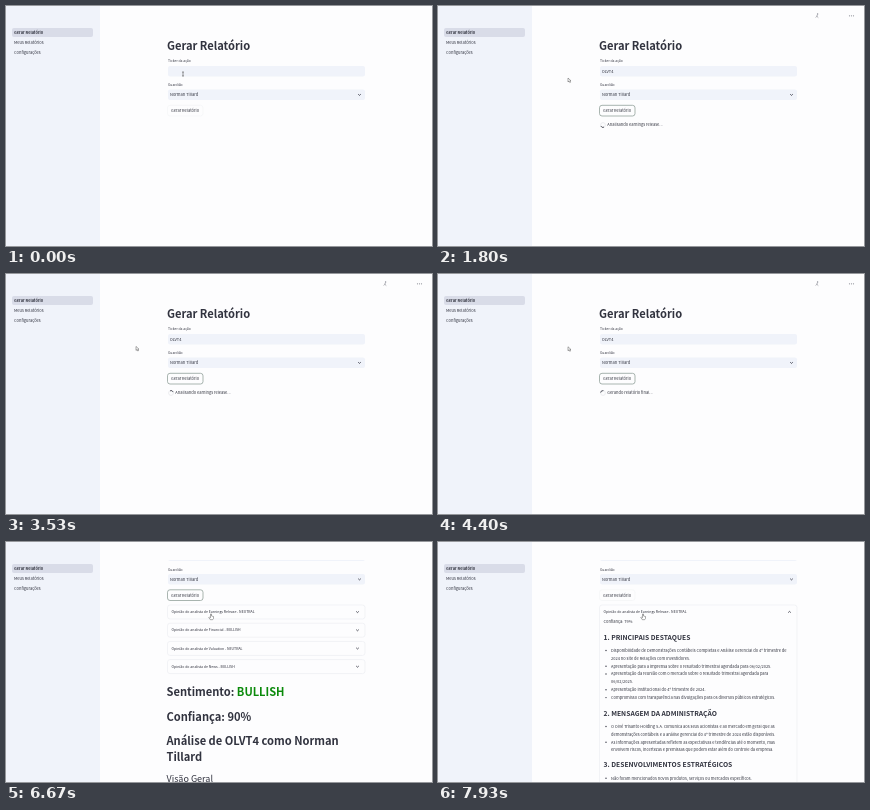
Write an HTML page with a canvas that moves like this. It is 426 by 240 pixels and loops after 8000 ms.

```html
<!DOCTYPE html>
<html lang="pt">
<head>
<meta charset="utf-8">
<title>Gerar Relatório</title>
<style>
html, body { margin: 0; width: 100%; height: 100%; overflow: hidden; background: #fdfdfe; }
canvas { display: block; width: 426px; height: 240px; }
</style>
</head>
<body>
<canvas id="stage"></canvas>
<script>
const W = 426, H = 240, LOOP = 8000, FPS = 15;
const FONT = '"Noto Sans CJK JP", "Noto Sans CJK SC", "Noto Sans CJK", "Open Sans", sans-serif';
const PAGE = '#fdfdfe', INK = '#31333f', PANEL = '#f0f3fa', LINE = '#eceef2', GREEN = '#0b8a0b';
const TICKER = 'OLVT4', PERSON = ['Norman', 'Tillard'], COMPANY = 'Olvé Trisanto Holding S.A.';
const SCROLL = 51.5, OPEN_HEIGHT = 230, HEADING = 11.1;

// Moments in ms
const T = { type: 300, key: 120, run: 1300, final: 3600, done: 5000, scroll: 5900, open: 7130 };

const POINTER = [
  [0, 177, 68], [950, 177, 68], [1200, 180, 105], [1300, 180, 105], [1600, 130, 72],
  [5650, 130, 73], [5900, 205, 72], [LOOP, 205, 72]
];

const ANALYSTS = ['Earnings Release - NEUTRAL', 'Financial - BULLISH', 'Valuation - NEUTRAL', 'News - BULLISH'];

// Lines starting with "*" carry a bullet
const REPORT = [
  { title: '1. PRINCIPAIS DESTAQUES', y: 97.5, first: 109.8, lines: [
    '*Disponibilidade de Demonstrações Contábeis Completas e Análise Gerencial do 4º trimestre de',
    '2024 no site de Relações com Investidores.',
    '*Apresentação para a imprensa sobre o resultado trimestral agendada para 06/02/2025.',
    '*Apresentação da reunião com o mercado sobre o resultado trimestral agendada para',
    '06/02/2025.',
    '*Apresentação institucional do 4º trimestre de 2024.',
    '*Compromisso com transparência nas divulgações para os diversos públicos estratégicos.'] },
  { title: '2. MENSAGEM DA ADMINISTRAÇÃO', y: 173.5, first: 185.8, lines: [
    `*O ${COMPANY} comunica aos seus acionistas e ao mercado em geral que as`,
    'demonstrações contábeis e a análise gerencial do 4º trimestre de 2024 estão disponíveis.',
    '*As informações apresentadas refletem as expectativas e tendências até o momento, mas',
    'envolvem riscos, incertezas e premissas que podem estar além do controle da empresa.'] },
  { title: '3. DESENVOLVIMENTOS ESTRATÉGICOS', y: 225, first: 237.6, lines: [
    '*Não foram mencionados novos produtos, serviços ou mercados específicos.'] }
];

const canvas = document.getElementById('stage');
const ctx = canvas.getContext('2d');
const ratio = window.devicePixelRatio || 1;
canvas.width = W * ratio;
canvas.height = H * ratio;

const clamp = x => Math.max(0, Math.min(1, x));
const ease = x => x * x * (3 - 2 * x);
const progress = (t, start, length) => ease(clamp((t - start) / length));

// Set large and scaled down evenly, so tiny glyphs keep their true shapes
function text(str, x, y, size, weight = 400, color = INK) {
  const em = 64, scale = size / em;
  ctx.save();
  ctx.translate(x, y);
  ctx.scale(scale, scale);
  ctx.font = `${weight} ${em}px ${FONT}`;
  ctx.fillStyle = color;
  ctx.fillText(str, 0, 0);
  const width = ctx.measureText(str).width * scale;
  ctx.restore();
  return x + width;
}

function box(x, y, w, h, r, fill, stroke) {
  ctx.beginPath();
  ctx.roundRect(x, y, w, h, r);
  if (fill) { ctx.fillStyle = fill; ctx.fill(); }
  if (stroke) { ctx.strokeStyle = stroke; ctx.lineWidth = 0.7; ctx.stroke(); }
}

function path(points, color, width) {
  ctx.beginPath();
  points.forEach(([x, y]) => ctx.lineTo(x, y));
  ctx.strokeStyle = color;
  ctx.lineWidth = width;
  ctx.stroke();
}

function dot(x, y, r, color) {
  ctx.beginPath();
  ctx.arc(x, y, r, 0, Math.PI * 2);
  ctx.fillStyle = color;
  ctx.fill();
}

function chevron(x, y, up) {
  const d = up ? -0.6 : 0.6;
  path([[x - 1.3, y - d], [x, y + d], [x + 1.3, y - d]], INK, 0.8);
}

function sidebar() {
  ctx.fillStyle = PANEL;
  ctx.fillRect(0, 0, 94, H);
  box(6, 22, 81, 9, 2, '#d9dce8');
  text('Gerar Relatório', 8, 28, 3.9, 700);
  text('Meus Relatórios', 8, 38.3, 4);
  text('Configurações', 8, 48.3, 4);
}

function form(t) {
  text('Gerar Relatório', 161, 44.3, HEADING, 700);
  text('Ticker da ação', 162, 56.2, 3.4);
  box(162, 60, 197, 10.5, 2, PANEL);
  const typed = Math.floor((t - T.type) / T.key);
  text(TICKER.slice(0, Math.max(0, typed)), 163.7, 66.7, 4);
  text('Guardião', 162, 80, 3.4);
  box(162, 83.5, 197, 10.5, 2, PANEL);
  text(PERSON.join(' '), 164, 90.2, 4);
  chevron(353.5, 88.8);
  const focused = t >= T.run && t < T.open;
  box(161.5, 99.3, 35.5, 10.7, 2.5, PAGE, focused ? '#85958f' : '#f4f5f7');
  text('Gerar Relatório', 165, 106, 4);
}

function spinner(t) {
  const angle = (110 + 0.325 * (t - 1800)) * Math.PI / 180;
  ctx.lineWidth = 0.8;
  ctx.strokeStyle = '#e8e9ed';
  ctx.beginPath();
  ctx.arc(165, 119, 2.4, 0, Math.PI * 2);
  ctx.stroke();
  ctx.strokeStyle = INK;
  ctx.beginPath();
  ctx.arc(165, 119, 2.4, angle - 0.8, angle + 0.8);
  ctx.stroke();
  text(t < T.final ? 'Analisando earnings release...' : 'Gerando relatório final...', 169.3, 120.2, 4);
}

function report() {
  text('Confiança: 79%', 165.5, 81, 4);
  for (const part of REPORT) {
    text(part.title, 165.5, part.y, 6.75, 700);
    part.lines.forEach((line, i) => {
      const y = part.first + i * 7.85;
      if (line[0] === '*') dot(168, y - 1.3, 0.7, INK);
      text(line.replace('*', ''), 173, y, 4);
    });
  }
}

function results(t) {
  const grow = OPEN_HEIGHT * progress(t, T.open, 300);
  ANALYSTS.forEach((name, i) => {
    const y = 114.5 + i * 18.2 + (i ? grow : 0);
    const extra = i ? 0 : grow;
    box(161.5, y, 197.5, 14 + extra, 2.5, PAGE, LINE);
    text('Opinião do analista de ' + name, 165.5, y + 8.2, 3.5);
    chevron(351.5, y + 7, extra > 0);
    if (extra > 0) {
      ctx.save();
      ctx.beginPath();
      ctx.rect(161, y + 14, 198, extra);
      ctx.clip();
      ctx.translate(0, SCROLL);
      report();
      ctx.restore();
    }
  });
  ctx.save();
  ctx.translate(0, grow);
  const x = text('Sentimento: ', 160.5, 205, HEADING, 700);
  text('BULLISH', x, 205, HEADING, 700, GREEN);
  text('Confiança: 90%', 160.5, 230, HEADING, 700);
  text(`Análise de ${TICKER} como ${PERSON[0]}`, 160.5, 254.8, HEADING, 700);
  text(PERSON[1], 160.5, 270, HEADING, 700);
  text('Visão Geral', 160.5, 291.6, 9, 500);
  ctx.restore();
}

function toolbar() {
  // Small running figure and menu dots
  dot(379.6, 8, 0.7, '#8b8d96');
  path([[379.3, 8.8], [378.9, 10.3], [380.3, 11.6]], '#8b8d96', 0.7);
  path([[378.9, 10.3], [377.6, 11.4]], '#8b8d96', 0.7);
  for (let i = 0; i < 3; i++) dot(411.5 + i * 2, 9.8, 0.6, '#8b8d96');
}

function pointerAt(t) {
  const i = POINTER.findIndex(p => p[0] > t);
  const [t0, x0, y0] = POINTER[i - 1], [t1, x1, y1] = POINTER[i];
  const k = progress(t, t0, t1 - t0);
  return [x0 + (x1 - x0) * k, y0 + (y1 - y0) * k];
}

function pointer(t) {
  const [x, y] = pointerAt(t);
  ctx.save();
  ctx.translate(x, y);
  if (t < 1000) {
    path([[-1, -2], [1, -2]], '#555', 0.6);
    path([[0, -2], [0, 2]], '#555', 0.6);
    path([[-1, 2], [1, 2]], '#555', 0.6);
  } else {
    const hand = (t >= 1150 && t < 1350) || t >= T.scroll + 400;
    const shape = new Path2D(hand
      ? 'M-.5 0h1v2l2 .5v2l-.8 1.2h-2.4l-1.5-2.2.5-.5 1.2.8z'
      : 'M0 0v4l1-.9.8 1.5.7-.4-.7-1.4h1.2z');
    ctx.fillStyle = '#fff';
    ctx.strokeStyle = '#555';
    ctx.lineWidth = 0.5;
    ctx.fill(shape);
    ctx.stroke(shape);
  }
  ctx.restore();
}

function draw(t) {
  ctx.setTransform(ratio, 0, 0, ratio, 0, 0);
  ctx.fillStyle = PAGE;
  ctx.fillRect(0, 0, W, H);
  const running = t >= T.run && t < T.done;
  ctx.save();
  ctx.translate(0, -SCROLL * progress(t, T.scroll, 500));
  form(t);
  if (running) spinner(t);
  if (t >= T.done) results(t);
  ctx.restore();
  ctx.fillStyle = PAGE;
  ctx.fillRect(94, 0, W - 94, 18);
  if (running) toolbar();
  sidebar();
  pointer(t);
}

function frame() {
  const step = Math.floor((performance.now() % LOOP) * FPS / 1000);
  draw(step * 1000 / FPS);
  requestAnimationFrame(frame);
}
frame();
</script>
</body>
</html>
```
